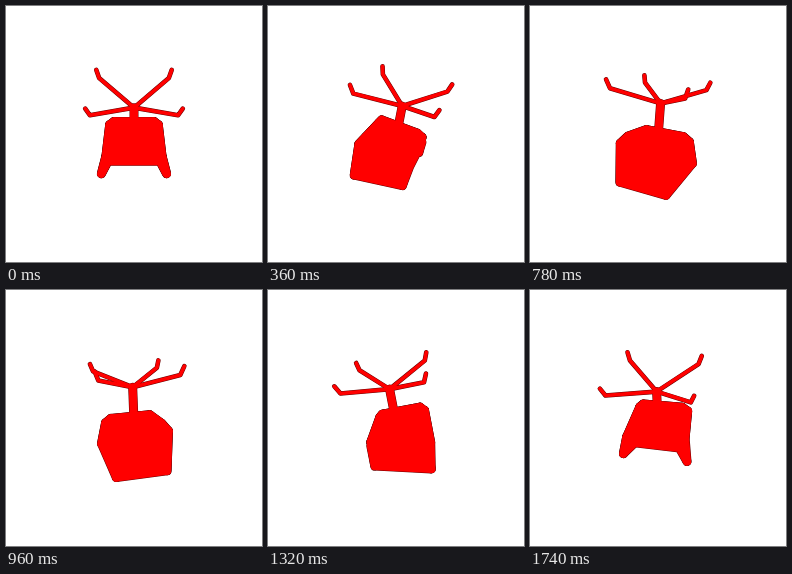
Write an HTML page with a canvas that moves like this. It is 256 by 256 pixels and loops after 1.8 s.

```html
<!DOCTYPE html>
<html>
<head>
<meta charset="utf-8">
<style>
html, body { margin: 0; width: 100%; height: 100%; overflow: hidden; background: #fff; }
canvas { display: block; }
</style>
</head>
<body>
<canvas id="stage" width="256" height="256"></canvas>
<script>
const ctx = document.getElementById('stage').getContext('2d');
const LOOP = 1800, STEP = 60, FOCAL = 265;
const tilt = 10 * Math.PI / 180, view = 27 * Math.PI / 180;
const { sin, cos, PI } = Math;

// Shell corners, mirrored left and right: [u, v, w] with w along the stem
const pair = (u, v, w) => [[-u, v, w], [u, v, w]];
const [topBackL, topBackR] = pair(21, 24, 4);
const [topFrontL, topFrontR] = pair(21, -17, 1);
const [rimBackL, rimBackR] = pair(26.5, 28, -3);
const [rimFrontL, rimFrontR] = pair(26.5, -22, -5);
const [backL, backR] = pair(24.5, 30, -42.5);
const [footL, footR] = pair(32.5, -22, -28);
const [archL, archR] = pair(25, -23.5, -10);
const faces = [
  [topBackL, topBackR, topFrontR, topFrontL],
  [topBackL, topBackR, rimBackR, rimBackL],
  [topFrontL, topFrontR, rimFrontR, rimFrontL],
  [topBackL, topFrontL, rimFrontL, rimBackL],
  [topBackR, topFrontR, rimFrontR, rimBackR],
  [rimBackL, rimBackR, backR, backL],
  [rimBackL, rimFrontL, footL, backL],
  [rimBackR, rimFrontR, footR, backR],
  [rimFrontL, rimFrontR, footR, archR, archL, footL]
];

const hub = [0, 0, 35];
const stem = [hub, [0, 0, 0]];
const arms = [1, 3, 5, 7].map(k => {
  const at = (r, w) => [r * cos(k * PI / 4), r * sin(k * PI / 4), w];
  return [hub, at(49, 48.5), at(52.5, 56)];
});

// Tilted object spun about the vertical, seen from above in perspective
function project([u, v, w], spin) {
  const lean = v * cos(tilt) - w * sin(tilt);
  const z = w * cos(tilt) + v * sin(tilt);
  const x = u * cos(spin) - lean * sin(spin);
  const d = u * sin(spin) + lean * cos(spin);
  const scale = FOCAL / (FOCAL + d * cos(view) - z * sin(view));
  return [128 + scale * x, 132 - scale * (z * cos(view) + d * sin(view))];
}

function trace(points, spin, width, closed) {
  ctx.beginPath();
  for (const p of points) ctx.lineTo(...project(p, spin));
  if (closed) {
    ctx.closePath();
    ctx.fill();
  }
  ctx.lineWidth = width;
  ctx.stroke();
}

function paint(color, spin, extra) {
  ctx.fillStyle = ctx.strokeStyle = color;
  for (const face of faces) trace(face, spin, 8 + extra, true);
  for (const arm of arms) trace(arm, spin, 3.6 + extra);
  trace(stem, spin, 8 + extra);
}

function frame(now) {
  const t = Math.floor(now / STEP) * STEP % LOOP;
  const spin = t / LOOP * 2 * PI;
  ctx.fillStyle = '#fff';
  ctx.fillRect(0, 0, 256, 256);
  ctx.lineJoin = ctx.lineCap = 'round';
  paint('#600', spin, 1);
  paint('#f00', spin, 0);
  requestAnimationFrame(frame);
}
requestAnimationFrame(frame);
</script>
</body>
</html>
```
